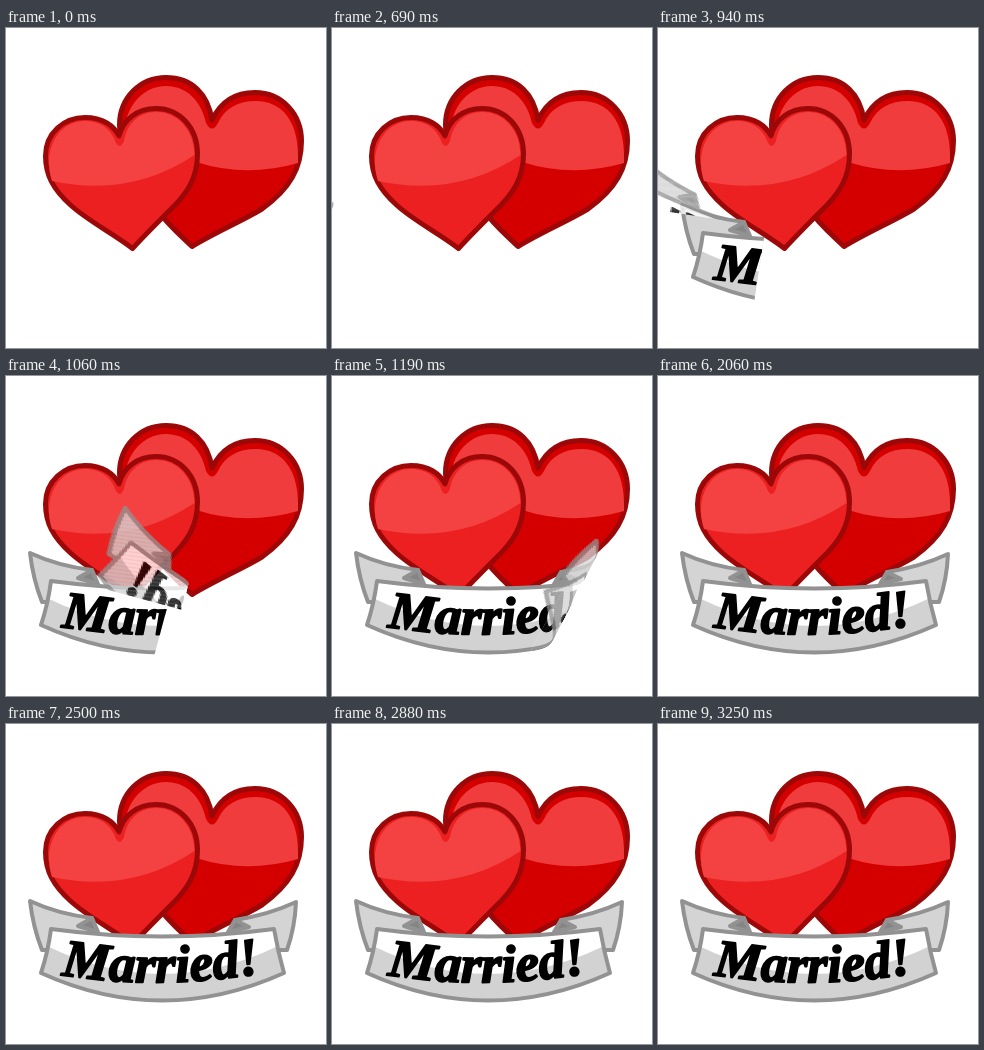
These frames come from a looping animation (320x320 px, 3310 ms). An HTML page with a canvas:

```html
<!DOCTYPE html>
<html lang="en">
<head>
<meta charset="utf-8">
<title>Married!</title>
<style>
  html, body { margin: 0; width: 100%; height: 100%; overflow: hidden; background: #fff; }
  svg, canvas { position: absolute; left: 0; top: 0; width: 320px; height: 320px; }
  #fold { opacity: .8; }
</style>
</head>
<body>
<svg viewBox="0 0 320 320" stroke-linejoin="round">
  <g stroke="#9c0808" stroke-width="5">
    <path fill="#d40000" d="M186 218.5C172 205 160 195 150 180C125 150 113.5 125 113.5 97C113.5 70 134 49.5 160 49.5C186 49.5 202 66 206 92C214 75 228 64.5 249 64.5C276 64.5 295.5 86 295.5 113C295.5 140 284 161 256 181C234 194 208 205 186 218.5Z"/>
    <path stroke="none" fill="#f03c3c" d="M120 112C115 84 134 58 160 58C180 58 195 72 200 95Q206 106 212 95C219 80 232 73 250 73C275 73 294 92 292 135Q240 150 190 134Z"/>
    <path fill="#ec2020" d="M126.5 220.5C108 206 82 193 64.5 177C47 161 39.5 147 39.5 128C39.5 105 58 89.5 79 89.5C97 89.5 108 98 113 108C117 92 131 80.5 150 80.5C174 80.5 191.5 100 191.5 126C191.5 150 181 166 163 183C150 196 138 208 126.5 220.5Z"/>
    <path stroke="none" fill="#f44242" d="M46 153C36 122 52 93 79 93C96 93 106 103 110 115Q114 122 118 113C121 96 133 84 150 84C172 84 188 102 188.5 127Q124 170 46 153Z"/>
  </g>
</svg>
<canvas id="flat" width="320" height="320"></canvas>
<canvas id="fold" width="320" height="320"></canvas>
<script>
const LOOP = 3310, FRAME = 62.5, RADIUS = 14, CORNER = 320;
const SIZE = 480, LIFT = 300, SCALE = 2;
const flat = document.getElementById('flat').getContext('2d');
const fold = document.getElementById('fold').getContext('2d');

function shape(g, d, fill, line) {
  const p = new Path2D(d);
  g.fillStyle = fill;
  g.fill(p);
  if (!line) return;
  g.strokeStyle = line;
  g.lineWidth = 4;
  g.lineJoin = 'round';
  g.stroke(p);
}

// Letters stand on a shallow bowl, each turned along it.
function arcText(g, text, x) {
  g.font = 'italic bold 53px "Liberation Serif", "Times New Roman", serif';
  g.fillStyle = g.strokeStyle = '#000';
  g.lineWidth = 1.8;
  for (const letter of text) {
    const width = g.measureText(letter).width;
    const dx = x + width / 2 - 150;
    g.save();
    g.translate(x + width / 2, 258.5 - .00085 * dx * dx);
    g.rotate(-.0017 * dx);
    g.fillText(letter, -width / 2, 0);
    g.strokeText(letter, -width / 2, 0);
    g.restore();
    x += width;
  }
}

function ribbon(g) {
  const edge = '#929292';
  shape(g, 'M24 177Q52 190 86 194L84 208L42 226L36 226Q27 203 24 177Z', '#d4d4d4', edge);
  shape(g, 'M290 178Q262 191 229 196L232 208L270 226L281 226Q289 203 290 178Z', '#d4d4d4', edge);
  shape(g, 'M72 202L86 194L92 208ZM243 203L229 196L222 208Z', '#858585', edge);
  const panel = 'M45 205Q156 220 268 205Q272 228 278 249Q156 304 35 249Q42 228 45 205Z';
  shape(g, panel, '#d2d2d2');
  shape(g, 'M45 206Q156 221 268 206L272 222Q156 278 41 222Z', '#fff');
  shape(g, panel, 'transparent', edge);
  arcText(g, 'Married!', 55);
}

const sheet = document.createElement('canvas');
sheet.width = sheet.height = SIZE * SCALE;
const turned = sheet.getContext('2d');

// Draw the ribbon turned so that the roll axis is vertical.
function turnSheet(tilt) {
  turned.setTransform(SCALE, 0, 0, SCALE, 0, 0);
  turned.clearRect(0, 0, SIZE, SIZE);
  turned.translate(0, LIFT);
  turned.rotate(-tilt);
  ribbon(turned);
}

function slices(g, tilt, from, to, start) {
  const bend = u => u < start + Math.PI * RADIUS
    ? start + RADIUS * Math.sin((u - start) / RADIUS)
    : 2 * start + Math.PI * RADIUS - u;
  g.save();
  g.rotate(tilt);
  for (let u = Math.max(0, from); u < Math.min(to, SIZE - 1); u++) {
    const a = bend(u), b = bend(u + 1);
    g.drawImage(sheet, u * SCALE, 0, SCALE, SIZE * SCALE,
      Math.min(a, b), -LIFT, Math.abs(b - a) + .4, SIZE);
  }
  g.restore();
}

function draw(step) {
  flat.clearRect(0, 0, 320, 320);
  fold.clearRect(0, 0, 320, 320);
  if (step < 11) return;
  if (step > 21) return ribbon(flat);

  // The lower right corner is dragged along a line; the fold lies halfway to it.
  const x = -307 + 54.8 * (step - 11), y = 292.6 - 8.8 * (step - 11);
  const tilt = Math.atan2(CORNER - y, CORNER - x);
  const crest = ((CORNER + x) * Math.cos(tilt) + (CORNER + y) * Math.sin(tilt)) / 2;
  const start = crest - Math.PI * RADIUS / 2;

  flat.save();
  flat.rotate(tilt);
  flat.beginPath();
  flat.rect(-600, -600, 600 + start, 1400);
  flat.clip();
  flat.rotate(-tilt);
  ribbon(flat);
  flat.restore();

  turnSheet(tilt);
  slices(flat, tilt, start, crest, start);
  slices(fold, tilt, crest, SIZE, start);
}

let last = -1;
function tick() {
  const step = Math.floor((performance.now() % LOOP + 2.6) / FRAME);
  if (step !== last) draw(last = step);
  requestAnimationFrame(tick);
}
tick();
</script>
</body>
</html>
```
